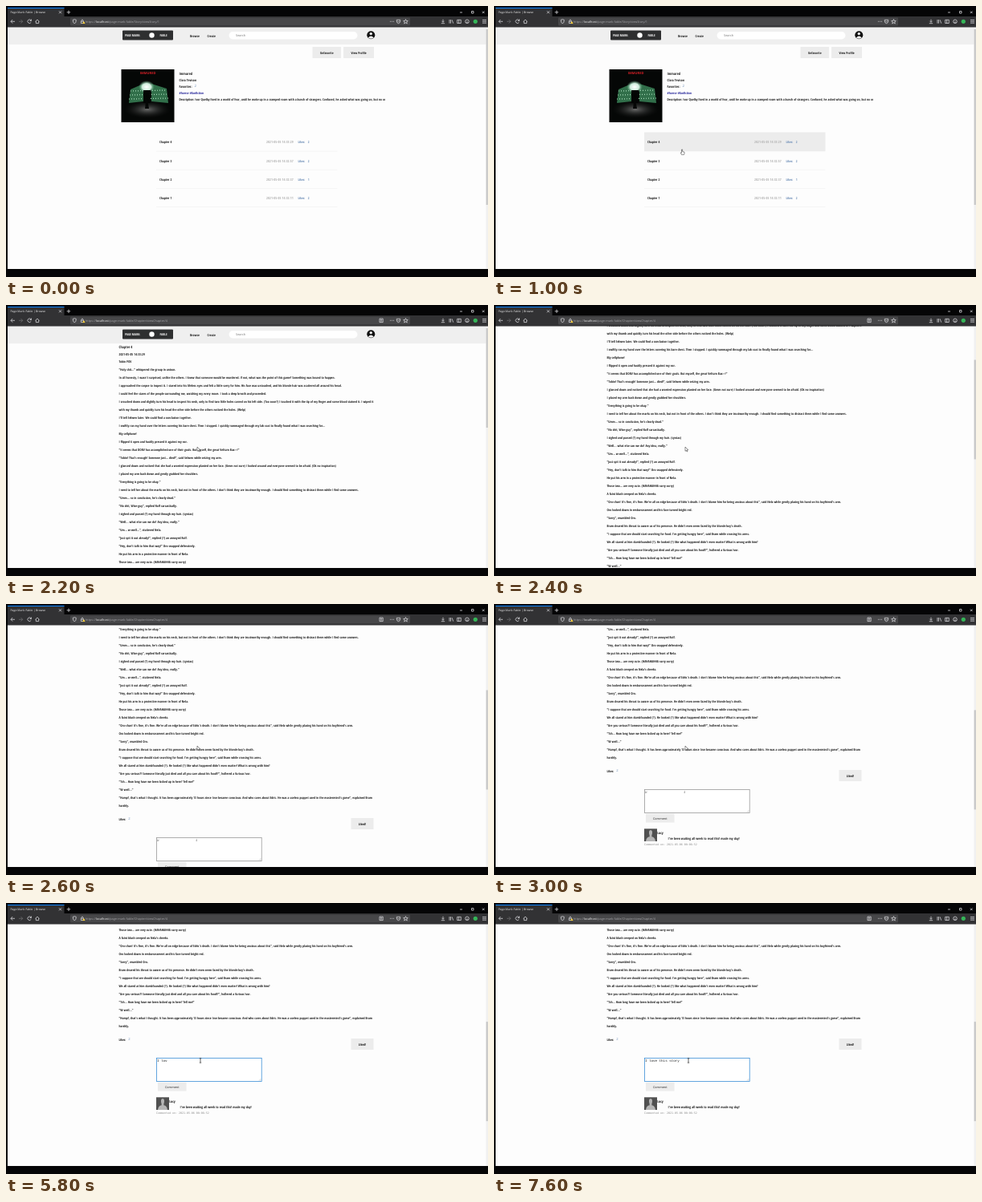
Recreate the animation shown at these times as an HTML page. Size 600x338 px, loop 8000 ms.

```html
<!DOCTYPE html>
<html lang="en">
<head>
<meta charset="utf-8">
<title>Reader</title>
<style>
html, body { margin: 0; width: 100%; height: 100%; overflow: hidden; background: #000; }
svg { display: block; width: 100vw; height: 100vh; }
text { font-family: "Open Sans", sans-serif; font-weight: 300; fill: #222; text-rendering: geometricPrecision; white-space: pre; }
.narrow { font-family: "Open Sans Condensed", "Open Sans", sans-serif; font-stretch: condensed; }
.mid { text-anchor: middle; }
.bold { font-weight: 700; }
.reg { font-weight: 400; }
.pale { fill: #b4b4b4; }
.grey { fill: #777; }
.blue { fill: #6f8fb8; }
.link { fill: #2a2a9c; }
.white { fill: #f4f4f4; font-weight: 400; }
.url { fill: #a5a5a8; font-weight: 400; }
.red { fill: #d31f26; font-weight: 700; }
.mono { font-family: "Liberation Mono", monospace; font-weight: 400; }
.small { font-family: "DejaVu Sans Mono", monospace; font-weight: 400; fill: #8c8c8c; }
.line { fill: none; stroke: #d5d5d8; stroke-width: .8; }

.a { animation: 8s step-end infinite; }
#overview { animation-name: overview; }
#chapter { animation-name: chapter, scroll; --s: 0; }
#scrolled { transform: translateY(calc(var(--s) * -1px)); }
#thumb { transform: translateY(calc(var(--s) * .415px)); }
#hover { animation-name: hover; }
.idle { animation-name: idle; }
.busy { animation-name: busy; }
.before { animation-name: before; }
.after { animation-name: after; }
#focus { animation-name: focus; }
#hint { animation-name: hint; }
#typed { animation-name: typed; }
#cover { animation-name: cover; }
#cursor { animation-name: cursor; }
#arrow { animation-name: arrow; }
#hand { animation-name: hand; }
#beam { animation-name: beam; }

@keyframes overview { 0% { opacity: 1 } 25%, 100% { opacity: 0 } }
@keyframes chapter { 0% { opacity: 0 } 25%, 100% { opacity: 1 } }
@keyframes idle { 0% { opacity: 1 } 17.5% { opacity: 0 } 25%, 100% { opacity: 1 } }
@keyframes busy { 0% { opacity: 0 } 17.5% { opacity: 1 } 25%, 100% { opacity: 0 } }
@keyframes before { 0% { opacity: 1 } 17.5%, 100% { opacity: 0 } }
@keyframes after { 0% { opacity: 0 } 17.5%, 100% { opacity: 1 } }
@keyframes scroll {
  0% { --s: 0 } 30% { --s: 95 } 32.5% { --s: 189 } 35% { --s: 222 } 37.5% { --s: 249 }
  40% { --s: 268 } 42.5% { --s: 280 } 45%, 100% { --s: 287 }
}
@keyframes hover {
  0% { opacity: 0; transform: translateY(69.6px) }
  5% { opacity: 1; transform: translateY(69.6px) }
  7.5% { opacity: 1; transform: translateY(46.4px) }
  10% { opacity: 1; transform: translateY(23.2px) }
  12.5%, 100% { opacity: 1; transform: none }
}
@keyframes cursor {
  0%, 2.5% { transform: translate(158px, 228px) }
  5% { transform: translate(196px, 236px) }
  7.5% { transform: translate(214px, 220px) }
  10% { transform: translate(226px, 199px) }
  12.5% { transform: translate(234px, 179px) }
  15% { transform: translate(238px, 177px) }
  47.5% { transform: translate(240px, 186px) }
  50%, 100% { transform: translate(242px, 196.5px) }
}
@keyframes arrow { 0% { opacity: 0 } 2.5% { opacity: 1 } 5% { opacity: 0 } 25% { opacity: 1 } 50%, 100% { opacity: 0 } }
@keyframes hand { 0% { opacity: 0 } 5% { opacity: 1 } 25%, 100% { opacity: 0 } }
@keyframes beam { 0% { opacity: 0 } 50%, 100% { opacity: 1 } }
@keyframes focus { 0% { stroke: #999 } 52.5%, 100% { stroke: #3d8fd6 } }
@keyframes hint { 0% { opacity: 1 } 62.5%, 100% { opacity: 0 } }
@keyframes typed { 0% { opacity: 0 } 62.5%, 100% { opacity: 1 } }
@keyframes cover {
  0%, 62.5% { transform: translateX(2.52px) } 65% { transform: translateX(5.04px) }
  67.5% { transform: translateX(7.56px) } 70% { transform: translateX(10.08px) }
  72.5% { transform: translateX(12.6px) } 75% { transform: translateX(15.12px) }
  77.5% { transform: translateX(25.2px) } 80% { transform: translateX(35.28px) }
  82.5%, 100% { transform: translateX(43.5px) }
}
</style>
</head>
<body>
<svg viewBox="0 0 600 338">
  <defs>
    <radialGradient id="glow"><stop offset="0" stop-color="#fff"/><stop offset=".55" stop-color="#cfeedd"/><stop offset="1" stop-color="#4f9a70" stop-opacity="0"/></radialGradient>
    <radialGradient id="floor"><stop offset="0" stop-color="#bbb"/><stop offset="1" stop-color="#222" stop-opacity="0"/></radialGradient>
    <g id="nav">
      <path d="M2 26H598V48H2Z" fill="#efefef"/>
      <rect x="145" y="30.5" width="63" height="12" rx="1" fill="#2e2f30"/>
      <circle cx="181.5" cy="36.5" r="3.2" fill="#fff"/>
      <rect x="277.5" y="32" width="160" height="9.5" rx="4.75" fill="#fff"/>
      <circle cx="454.3" cy="36.3" r="5" fill="#111"/>
      <circle cx="454.3" cy="34.6" r="1.7" fill="#efefef"/>
      <path d="M450.9 39.4Q454.3 35.4 457.7 39.4Q454.3 42 450.9 39.4Z" fill="#efefef"/>
    </g>
  </defs>
  <path d="M2 26H600V328H2Z" fill="#fdfdfd"/>

  <g id="overview" class="a">
    <use href="#nav"/>
    <path d="M381.5 51H417V65H381.5ZM420 51H458V65H420Z" fill="#ececec"/>
    <path d="M143.5 79H209.5V145H143.5Z" fill="#050706"/>
    <path d="M155 104L171 97V119L153 121ZM181 97L200 103L202 121L181 119Z" fill="#3d8a5c" opacity=".8"/>
    <path d="M155 106L200 105M154 111L201 110M153 116L202 115" stroke="#a7dcb9" stroke-width="1.2" stroke-dasharray="1 2" fill="none"/>
    <ellipse cx="176" cy="129" rx="29" ry="11" fill="url(#floor)" opacity=".55"/>
    <ellipse cx="175" cy="101" rx="10" ry="8" fill="url(#glow)"/>
    <path d="M171 105H180V121H171Z" fill="#030504"/>
    <path d="M175 111L178 128H173Z" fill="#050706"/>
    <path d="M187 181.2H412.5M187 204.4H412.5M187 227.6H412.5M187 250.5H412.5" stroke="#f5f5f5" fill="none"/>
    <path id="hover" class="a" d="M187 157.5H412.5V181H187Z" fill="#ececec"/>
    <g id="overviewText"></g>
    <path d="M472 110H490V124H472Z" fill="#fdfdfd"/>
    <path d="M597.5 26H600V328H597.5Z" fill="#f0f0f0"/>
    <path d="M597.7 29H599.8V248H597.7Z" fill="#c6c6c6"/>
  </g>

  <g id="chapter" class="a">
    <g id="scrolled">
      <use href="#nav"/>
      <path d="M429.5 456H457.5V470H429.5ZM189 510.7H224.5V521.5H189Z" fill="#ececec"/>
      <rect id="focus" class="a" x="187.4" y="480.5" width="130.8" height="29" fill="#fff" stroke="#999" stroke-width=".8"/>
      <path d="M315 508.5L317.2 506.3M316.3 508.7L317.4 507.6" stroke="#999" stroke-width=".4"/>
      <path d="M187 529.3H203V545H187Z" fill="#505050"/>
      <path d="M189 545Q189.5 539.8 193.6 539.3V537.5Q191.8 531 195 531Q198.2 531 196.4 537.5V539.3Q200.5 539.8 201 545Z" fill="#b5b5b5"/>
      <g id="chapterText"></g>
      <g id="hint" class="a"></g>
      <g id="typed" class="a"></g>
      <path id="cover" class="a" d="M188 481.2H234V487.5H188Z" fill="#fff"/>
    </g>
    <path d="M597.5 26H600V328H597.5Z" fill="#f0f0f0"/>
    <path id="thumb" d="M597.7 29H599.8V153H597.7Z" fill="#c6c6c6"/>
  </g>

  <path d="M0 0H600V13H0ZM0 0H2V338H0ZM0 328H600V338H0Z" fill="#050506"/>
  <path d="M2 13H600V26.5H2ZM2 2.5H72.5V13H2Z" fill="#323234"/>
  <path d="M2 2H72.5V2.9H2Z" fill="#0a84ff"/>
  <rect x="80" y="14.5" width="423" height="10" rx="1" fill="#474749"/>
  <g class="line">
    <path d="M66 6.3L69 9.3M69 6.3L66 9.3M78 5.5V10M75.7 7.8H80.2M565 8H568M579.5 6.5H582V9H579.5ZM593 6.5L595.6 9.1M595.6 6.5L593 9.1"/>
    <path d="M11 19.3H6M8.2 17L6 19.3L8.2 21.6"/>
    <path d="M16 19.3H20.5M18.5 17L20.7 19.3L18.5 21.6" opacity=".35"/>
    <path class="a idle" d="M31 17.7A2.3 2.3 0 1 0 31.3 20.2M31.5 16.5V18.5H29.5"/>
    <path class="a busy" d="M27 17.3L30.6 20.9M30.6 17.3L27 20.9"/>
    <path d="M36.5 19.3L39 17L41.5 19.3M37.3 19V21.6H40.7V19"/>
    <path d="M83.3 17.3L85.3 16.7L87.3 17.3Q87.5 20.8 85.3 22Q83.1 20.8 83.3 17.3Z"/>
    <path d="M93.8 19V18Q95 15.7 96.2 18V19M93.3 19.3H96.7V21.5H93.3Z"/>
    <path d="M478 19.3H479M480 19.3H481M482 19.3H483"/>
    <path d="M486.3 17.3H490.7V19Q490.3 21.5 488.5 21.7Q486.7 21.5 486.3 19ZM487.3 18.7L488.5 19.9L489.7 18.7"/>
    <path d="M497.5 16.6L498.3 18.5L500.3 18.6L498.7 19.9L499.3 21.9L497.5 20.8L495.7 21.9L496.3 19.9L494.7 18.6L496.7 18.5Z"/>
    <path class="a" style="animation-name:chapter" d="M465 17H469.2V21.6H465ZM466 18.5H468.2M466 20H468.2"/>
    <path d="M544 16.7V20.2M542.4 18.7L544 20.3L545.6 18.7M541.8 21.7H546.2"/>
    <path d="M552 17V21.7M553.6 17V21.7M555.2 17.3L556.8 21.7M561.7 17.3H566.3V21.5H561.7ZM563.7 17.3V21.5"/>
    <path d="M571.7 19.3A2.3 2.3 0 1 0 576.3 19.3A2.3 2.3 0 1 0 571.7 19.3M572.5 20.7Q574 18.8 575.5 20.7"/>
    <path d="M593 17.4H598M593 19.3H598M593 21.2H598"/>
  </g>
  <path d="M95.2 22L96.9 19L98.6 22Z" fill="#ffd43b"/>
  <circle cx="584.3" cy="19.3" r="2.6" fill="#35b558"/>
  <circle class="a busy" cx="8" cy="8" r=".9" fill="#0a84ff"/>
  <path class="a busy" d="M2 321H85V328H2Z" fill="#323234"/>
  <g id="title" class="a idle"></g>
  <g id="loading" class="a busy"></g>
  <g id="oldUrl" class="a before"></g>
  <g id="newUrl" class="a after"></g>

  <g id="cursor" class="a" stroke="#222" stroke-width=".5" stroke-linejoin="round">
    <path id="arrow" class="a" fill="#fff" d="M0 0V5.3L1.3 4.2L2.2 6L3 5.6L2.2 3.9L3.8 3.8Z"/>
    <path id="hand" class="a" fill="#fff" d="M-.5 0Q.2 -.7 .6 0V2.5L3 3.2V5L2.3 6.7H-.3L-1.8 4.2L-1.2 3.6L-.5 4.3Z"/>
    <path id="beam" class="a" fill="none" stroke-width=".7" d="M-1.2 -2.7H1.2M0 -2.7V2.7M-1.2 2.7H1.2"/>
  </g>
</svg>
<script>
const lines = `“Holy shit...” whispered the group in unison.
In all honesty, I wasn't surprised, unlike the others. I knew that someone would be murdered. If not, what was the point of this game? Something was bound to happen.
I approached the corpse to inspect it. I stared into his lifeless eyes and felt a little sorry for him. His face was untouched, and his blonde hair was scattered all around his head.
I could feel the stares of the people surrounding me, watching my every move. I took a deep breath and proceeded.
I crouched down and slightly turn his head to inspect his neck, only to find two little holes carved on his left side. (Too soon?) I touched it with the tip of my finger and some blood stained it. I wiped it
with my thumb and quickly turn his head the other side before the others noticed the holes. (Welp)
I'll tell Selwen later. We could find a conclusion together.
I swiftly ran my hand over the letters covering his bare chest. Then I stopped. I quickly rummaged through my lab coat to finally found what I was searching for...
My cellphone!
I flipped it open and hastily pressed it against my ear.
“It seems that DORV has accomplished one of their goals. But myself, the great Velturn Bax—!”
“Tobin! That's enough! Someone just... died!”, said Selwen while seizing my arm.
I glanced down and noticed that she had a worried expression planted on her face. (Umm not sure) I looked around and everyone seemed to be afraid. (Ok no inspiration)
I placed my arm back down and gently grabbed her shoulders.
“Everything is going to be okay.”
I need to tell her about the marks on his neck, but not in front of the others. I don't think they are trustworthy enough. I should find something to distract them while I find some answers.
“Umm... so in conclusion, he's clearly dead.”
“No shit, Wise-guy”, replied Rolf sarcastically.
I sighed and passed (?) my hand through my hair. (syntax)
“Well... what else can we do? Any idea, really.”
“Um... w-well...”, stuttered Nela.
“Just spit it out already!”, replied (?) an annoyed Rolf.
“Hey, don't talk to him that way!” Oro snapped defensively.
He put his arm in a protective manner in front of Nela.
Those two... are very cute. (HAHAHAHHA sorry sorry)
A faint blush creeped on Nela's cheeks.
“Oro-chan! It's fine, it's fine. We're all on edge because of Edric's death. I don't blame him for being anxious about this”, said Nela while gently placing his hand on his boyfriend's arm.
Oro looked down in embarrassment and his face turned bright red.
“Sorry”, mumbled Oro.
Bram cleared his throat to aware us of his presence. He didn't even seem fazed by the blonde boy's death.
“I suppose that we should start searching for food. I'm getting hungry here”, said Bram while crossing his arms.
We all stared at him dumbfounded (?). He looked (?) like what happened didn't even matter! What is wrong with him?
“Are you serious?! Someone literally just died and all you care about his food!?”, hollered a furious Ivor.
“Tch... How long have we been locked up in here? Tell me!”
“W-well...”
“Humpf, that's what I thought. It has been approximately 13 hours since Ivor became conscious. And who cares about Edric. He was a useless puppet used in the mastermind's game”, explained Bram
harshly.`.split("\n");

// Use the condensed cut when present, otherwise narrow the normal one by one fixed ratio.
const pen = document.createElement("canvas").getContext("2d");
const ems = (stretch, family) => {
  pen.font = `${stretch} 300 100px ${family}`;
  return pen.measureText(lines[4]).width / 100;
};
const cut = ems("condensed", '"Open Sans Condensed", "Open Sans", sans-serif');
const ratio = cut < ems("normal", '"Open Sans", sans-serif') * .9 ? 1 : .72;
const unit = 63.6 / (cut * ratio);

function say(parent, x, y, words, size = 5, cls = "") {
  const node = document.createElementNS("http://www.w3.org/2000/svg", "text");
  node.setAttribute("class", cls);
  node.setAttribute("transform", `translate(${x} ${y})`);
  node.style.fontSize = size + "px";
  node.textContent = words;
  document.getElementById(parent).append(node);
  return node;
}
function sayNarrow(parent, x, y, words, size = 5, cls = "") {
  const node = say(parent, x, y, words, size * unit, cls + " narrow");
  node.setAttribute("transform", `translate(${x} ${y}) scale(${ratio} 1)`);
}

// Navigation bar
sayNarrow("nav", 148, 38.3, "PAGE MARK:", 5, "white bold");
sayNarrow("nav", 191.5, 38.3, "FABLE", 5, "white bold");
sayNarrow("nav", 229, 38.6, "Browse", 5.1, "reg");
sayNarrow("nav", 250.5, 38.6, "Create", 5.1, "reg");
say("nav", 286, 38.3, "Search", 3.9, "grey reg");

// Overview page
sayNarrow("overviewText", 399.2, 59.8, "Unfavorite", 5, "mid reg");
sayNarrow("overviewText", 439, 59.8, "View Profile", 5, "mid reg");
say("overviewText", 176.5, 84.8, "IMMURED", 4, "mid red");
sayNarrow("overviewText", 215.5, 85.8, "Immured", 5.6, "bold");
sayNarrow("overviewText", 215.5, 94.2, "Clara Tevison", 5.2);
sayNarrow("overviewText", 215.5, 102.2, "Favorites:", 5.2);
say("overviewText", 234.5, 101.2, "2", 4.4, "blue reg");
sayNarrow("overviewText", 215.5, 110.2, "#horror #fanfiction", 5, "link");
sayNarrow("overviewText", 215.5, 118.2, "Description: Ivor Quelby lived in a world of fear, until he woke up in a cramped room with a bunch of strangers. Confused, he asked what was going on, but no one");
[["33:29", 2], ["32:57", 2], ["32:37", 1], ["32:11", 2]].forEach(([time, likes], i) => {
  const y = 171.4 + i * 23.2;
  sayNarrow("overviewText", 191, y, "Chapter " + (4 - i), 5.1);
  sayNarrow("overviewText", 324, y, "2021-05-05 14:" + time, 5.3, "pale");
  sayNarrow("overviewText", 363.5, y, "Likes:", 5, "blue");
  sayNarrow("overviewText", 375.8, y, likes, 5, "blue");
});

// Chapter page
sayNarrow("chapterText", 140.5, 54.2, "Chapter 4", 5.6, "bold");
sayNarrow("chapterText", 140.5, 63, "2021-05-05 14:33:29", 5.1);
sayNarrow("chapterText", 140.5, 71.9, "Tobin POV", 5, "bold");
lines.forEach((line, i) => sayNarrow("chapterText", 140.5, 81.8 + i * 10, line));
sayNarrow("chapterText", 140.5, 458.7, "Likes:");
say("chapterText", 152.3, 457.8, "2", 4.2, "blue reg");
sayNarrow("chapterText", 443.5, 464.8, "Liked!", 5, "mid reg");
say("chapterText", 206.7, 517.5, "Comment", 3.8, "mid reg");
sayNarrow("chapterText", 203.3, 536.3, "Lucy", 5.4, "bold");
sayNarrow("chapterText", 216.5, 543.3, "I've been waiting all week to read this! made my day!", 5.2);
say("chapterText", 187, 550.3, "Commented on: 2021-05-06 08:06:52", 3.32, "small");
say("hint", 188, 484.6, "What is on your mind", 4.2, "mono grey");
say("typed", 188, 484.6, "I love this story", 4.2, "mono");

// Browser window
say("title", 5.5, 9.2, "Page Mark: Fable | Browse", 3.5, "white");
say("loading", 15, 9.2, "localhost/page-mark-fable/C", 3.5, "white");
say("loading", 4, 325.8, "localhost", 3.5, "white");
const address = (id, path) => {
  const node = say(id, 99, 20.7, "https://", 3.8, "url");
  const host = document.createElementNS(node.namespaceURI, "tspan");
  host.textContent = "localhost";
  host.style.fill = "#f4f4f4";
  node.append(host, "/page-mark-fable/" + path);
};
address("oldUrl", "Story/viewStory/1");
address("newUrl", "Chapter/viewChapter/4");
</script>
</body>
</html>
```
